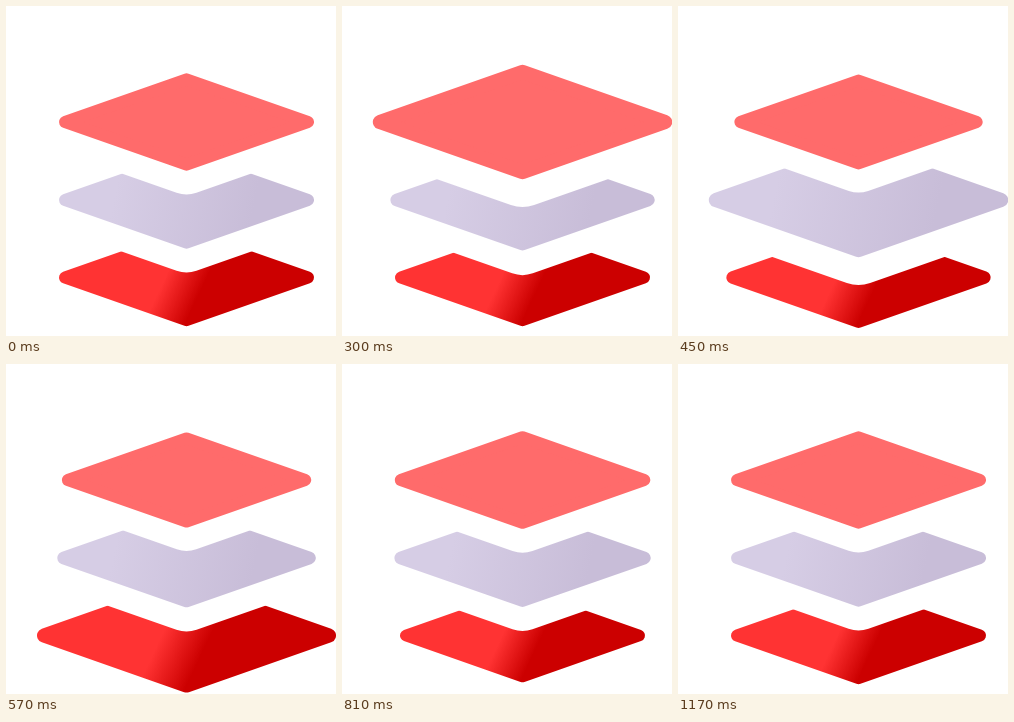
These frames come from a looping animation (330x330 px, 1980 ms). An HTML page:

```html
<!DOCTYPE html>
<html lang="en">
<head>
<meta charset="utf-8">
<title>Bouncing layers</title>
<style>
  html, body { margin: 0; width: 100%; height: 100%; overflow: hidden; background: #fff; }
  svg { display: block; width: 100%; height: 100%; }
  .tile { stroke-width: 12.4; stroke-linejoin: round; }
  .gap { fill: #fff; stroke: #fff; stroke-width: 60; stroke-linejoin: round; }
</style>
</head>
<body>
<svg viewBox="0 0 330 330">
  <defs>
    <polygon id="rhomb" points="-121.3,0 0,-42.45 121.3,0 0,42.45"/>
    <linearGradient id="lilac" gradientUnits="userSpaceOnUse" x1="-70" y1="-14" x2="66" y2="14">
      <stop stop-color="#d6cde5"/><stop offset="1" stop-color="#c8bdd8"/>
    </linearGradient>
    <linearGradient id="red" gradientUnits="userSpaceOnUse" x1="-25" y1="8" x2="9" y2="24">
      <stop stop-color="#ff3333"/><stop offset="1" stop-color="#cc0000"/>
    </linearGradient>
  </defs>
  <g class="layer"><use href="#rhomb" class="tile" fill="url(#red)" stroke="url(#red)"/></g>
  <g class="layer">
    <use href="#rhomb" class="gap"/>
    <use href="#rhomb" class="tile" fill="url(#lilac)" stroke="url(#lilac)"/>
  </g>
  <g class="layer">
    <use href="#rhomb" class="gap"/>
    <use href="#rhomb" class="tile" fill="#ff6b6b" stroke="#ff6b6b"/>
  </g>
</svg>
<script>
  const LOOP = 1980, STEP = 30, CENTER_X = 180.5;
  const smooth = x => x * x * (3 - 2 * x);
  const cubic = x => x < 0.5 ? 4 * x ** 3 : 1 - 4 * (1 - x) ** 3;

  // [time, scale, easing towards this key]
  const keys = [
    [60, 1],
    [300, 1.174, cubic],
    [480, 0.958, smooth],
    [690, 1.008, smooth],
    [870, 1, smooth]
  ];

  // bottom to top
  const stack = [
    { y: 271.5, delay: 300 },
    { y: 194, delay: 150 },
    { y: 116, delay: 0 }
  ];
  const layers = document.querySelectorAll('.layer');

  function scaleAt(t) {
    if (t <= keys[0][0]) return 1;
    for (let i = 1; i < keys.length; i++) {
      const [t0, a] = keys[i - 1], [t1, b, ease] = keys[i];
      if (t < t1) return a + (b - a) * ease((t - t0) / (t1 - t0));
    }
    return 1;
  }

  function draw(time) {
    const t = Math.floor(time % LOOP / STEP) * STEP;
    stack.forEach(({ y, delay }, i) => {
      const s = scaleAt(t - delay).toFixed(4);
      layers[i].setAttribute('transform', `translate(${CENTER_X} ${y}) scale(${s})`);
    });
  }

  let start;
  function tick(now) {
    start ??= now;
    draw(now - start);
    requestAnimationFrame(tick);
  }
  draw(0);
  requestAnimationFrame(tick);
</script>
</body>
</html>
```
